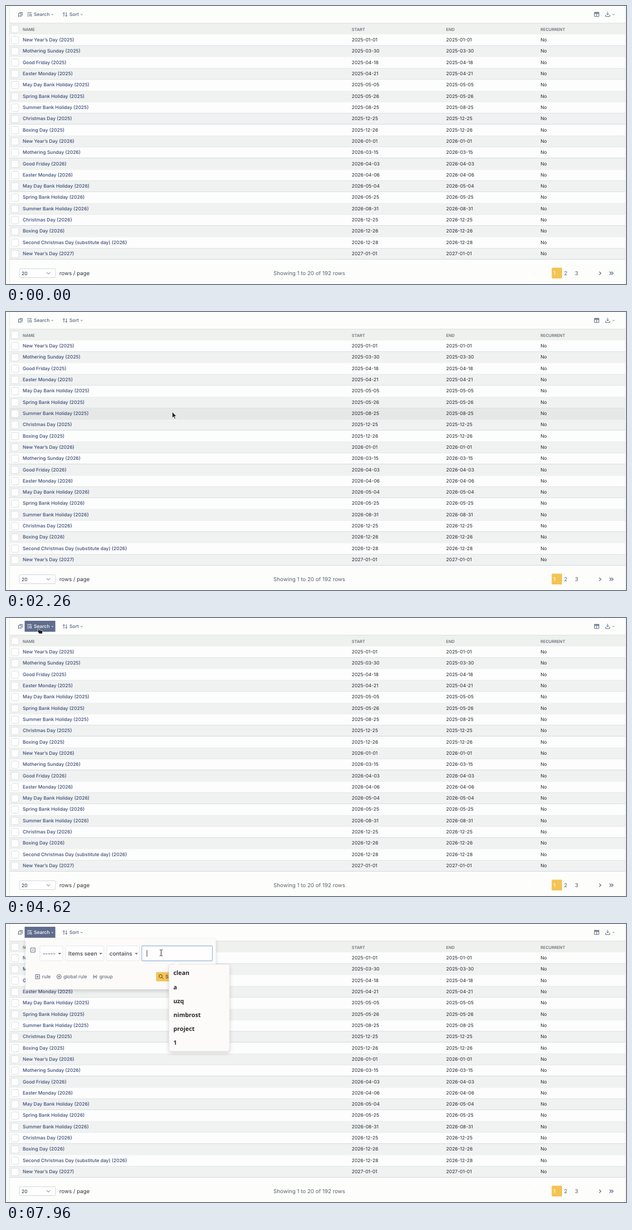
An HTML page that plays this animation: 1115x502 px, repeating every 8 s.

```html
<!DOCTYPE html>
<html lang="en">
<head>
<meta charset="utf-8">
<title>Holiday calendar</title>
<style>
html, body { margin: 0; width: 100%; height: 100%; overflow: hidden; background: #fdfefc; }
svg { display: block; }
text { font-family: Inter, sans-serif; font-size: 8.5px; white-space: pre; text-rendering: geometricPrecision; }
.link { fill: #3b4a79; font-size: 8.47px; font-weight: 500; }
.cell { fill: #23272e; }
.head { fill: #6a7380; font-size: 7.32px; font-weight: 600; }
.tool { fill: #53617f; font-weight: 500; }
.foot { fill: #59616d; font-size: 9.76px; }
.pick { fill: #41464f; font-size: 10px; font-weight: 500; }
.act { fill: #656d7b; font-weight: 500; }
.sugg { fill: #29282b; font: 600 10.8px "Noto Sans", sans-serif; }
.icon { fill: none; stroke: #5b6782; stroke-width: 1; }
.on .tool { fill: #fff; }
.on .icon { stroke: #fff; }
#panelBox, #popupBox { filter: drop-shadow(0 3px 3.6px rgba(0, 0, 0, .15)); }
</style>
</head>
<body>
<svg id="stage" width="1115" height="502" viewBox="0 0 1115 502">
  <g id="table"></g>
  <g id="toolbar"></g>
  <g id="footer"></g>
  <g id="panel"></g>
  <g id="popup"></g>
  <g id="cursor">
    <path id="arrow" fill="#222" stroke="#fff" stroke-width=".9" d="M0 0V11.2L2.6 8.8L4.6 13L6.4 12.1L4.5 8.1H8Z"/>
    <path id="hand" fill="#222" stroke="#fff" stroke-width=".7" d="M0 .8Q1-.5 2 .8V4.6L7.4 5.6Q8.6 6 8.4 7.5L7.6 11.5H2.4L-.8 7.6Q-1.3 6.4 0 6.5Z"/>
    <path id="beam" fill="none" stroke="#222" stroke-width="1" d="M-2.5-5.5Q0-5.5 0-4.5Q0-5.5 2.5-5.5M0-4.5V4.5M-2.5 5.5Q0 5.5 0 4.5Q0 5.5 2.5 5.5"/>
  </g>
</svg>
<script>
const $ = id => document.getElementById(id);
const NS = 'http://www.w3.org/2000/svg';
const LOOP = 8000, TOP = 51.4, STEP = 20.32;

function add(parent, tag, attrs, content) {
  const el = document.createElementNS(NS, tag);
  for (const k in attrs) el.setAttribute(k, attrs[k]);
  if (content) el.textContent = content;
  return parent.appendChild(el);
}
const text = (p, x, y, cls, s) => add(p, 'text', { x, y, class: cls }, s);
const rect = (p, x, y, width, height, fill, more) => add(p, 'rect', { x, y, width, height, fill, ...more });
const icon = (p, d, more) => add(p, 'path', { d, class: 'icon', ...more });
const chevron = (p, x, y, s = 1.6) => icon(p, `M${x - s} ${y - s / 2}l${s} ${s}l${s}-${s}`);
const show = (el, on) => { el.style.display = on ? '' : 'none'; };

// Holiday table
const holidays = ['New Year’s Day', 'Mothering Sunday', 'Good Friday', 'Easter Monday', 'May Day Bank Holiday',
  'Spring Bank Holiday', 'Summer Bank Holiday', 'Christmas Day', 'Boxing Day'];
const days = {
  2025: '01-01 03-30 04-18 04-21 05-05 05-26 08-25 12-25 12-26',
  2026: '01-01 03-15 04-03 04-06 05-04 05-25 08-31 12-25 12-26 12-28',
  2027: '01-01'
};
const entries = Object.entries(days).flatMap(([year, list]) => list.split(' ').map((day, i) =>
  [`${holidays[i] || 'Second Christmas Day (substitute day)'} (${year})`, `${year}-${day}`]));

const table = $('table');
const checkbox = y => rect(table, 9.5, y - 6.7, 13.4, 13.4, '#fdfefd', { rx: 2.5, stroke: '#d9dddd', 'stroke-width': .9 });
rect(table, 0, 0, 6, 502, '#f9faf6');
rect(table, 6, 31, 1108, 20.4, '#eff1ee');
const rowFill = i => i % 2 ? '#eff2f0' : '#fcfdfc';
const rows = entries.map(([name, date], i) => {
  const y = TOP + i * STEP, base = y + 12.6;
  const bg = rect(table, 6, y, 1108, STEP, rowFill(i));
  rect(table, 6, Math.floor(y + STEP), 1108, 1, '#d3d8e5');
  checkbox(y + 10.2);
  text(table, 30, base, 'link', name);
  text(table, 621.8, base, 'cell', date);
  text(table, 791.6, base, 'cell', date);
  text(table, 961.2, base, 'cell', 'No');
  return bg;
});
rect(table, 6, 30.5, 1108, .9, '#d6dae2');
rect(table, 6, 0, .8, 502, '#e3e6e6');
rect(table, 1113.4, 0, .8, 502, '#e3e6e6');
checkbox(41.4);
[['NAME', 30], ['START', 621.8], ['END', 791.6], ['RECURRENT', 961.2]]
  .forEach(([s, x]) => text(table, x, 45.4, 'head', s));

// Toolbar
const bar = $('toolbar');
icon(bar, 'M22.5 13.2h4.6v6l-2.3-1.7l-2.3 1.7zM24.3 11.6h5v6');
const search = add(bar, 'g', {});
const searchBg = rect(search, 33.5, 5, 55.2, 19.8, '#5f6d8e');
icon(search, 'M38.3 12h8M38.3 15h2.6M38.3 18h3.4M46.6 19l-1.4-1.4');
add(search, 'circle', { cx: 44, cy: 16.2, r: 1.8, class: 'icon' });
text(search, 50, 18.1, 'tool', 'Search');
chevron(search, 83.4, 15.3);
icon(bar, 'M104 19v-7.2m-2 2l2-2l2 2M108.4 11.4v7.4m-2-2l2 2l2-2');
text(bar, 114, 18.1, 'tool', 'Sort');
chevron(bar, 136, 15.3);
icon(bar, 'M1058.2 11.3h8v7.6h-8zM1058.2 12.3h8M1058.2 13.8h8M1062.2 13.8v5');
icon(bar, 'M1082 10.5v5.5m-2.3-2.2l2.3 2.2l2.3-2.2M1078.4 16v3h7.4v-3');
chevron(bar, 1092.6, 15.3);

// Footer
const foot = $('footer');
rect(foot, 24.2, 474.4, 65, 16, '#fdfefd', { rx: 2, stroke: '#cdd2d6', 'stroke-width': .9 });
text(foot, 28, 485.7, 'cell', '20');
chevron(foot, 76.2, 482.5, 3.2);
text(foot, 96, 486, 'foot', 'rows / page').style.fill = '#30363f';
text(foot, 481, 486, 'foot', 'Showing 1 to 20 of 192 rows');
rect(foot, 981.4, 472.5, 18.6, 19.5, '#f5c354', { rx: 1.5 });
text(foot, 984.2, 486, 'foot', '1').style.fill = '#fff';
text(foot, 1003.5, 486, 'foot', '2');
text(foot, 1023, 486, 'foot', '3');
icon(foot, 'M952 480l-2.6 2.6l2.6 2.6M971 480l-2.6 2.6l2.6 2.6', { opacity: .08 });
icon(foot, 'M1066.8 479.6l3 3l-3 3M1085.4 479.6l3 3l-3 3M1088.8 479.6l3 3l-3 3', { style: 'stroke-width:1.3' });

// Search panel
const panel = $('panel');
rect(panel, 35, 27, 342.4, 91, '#fcfbfa', { id: 'panelBox' });
const field = (x, w) => rect(panel, x, 39.5, w, 27, '#fefefe', { rx: 2, stroke: '#e6e6e8', 'stroke-width': .9 });
icon(panel, 'M44.3 43.3h8v7.6h-8zM46.3 47.1h4');
[['-----', 61, 41, 66], ['Items seen', 107, 69, 112], ['contains', 181, 59, 186]].forEach(([s, x, w, tx]) => {
  field(x, w);
  text(panel, tx, 56.6, 'pick', s);
  add(panel, 'path', { d: `M${x + w - 8.4} 52.3h5.6l-2.8 3z`, fill: '#686c74' });
});
const input = field(244.2, 127);
const caret = rect(panel, 253, 47, .9, 12, '#333');
icon(panel, 'M53 91.5h7.4v7.4h-7.4zM54.6 95.2h4.2M56.7 93.1v4.2');
text(panel, 64.8, 98.2, 'act', 'rule');
add(panel, 'circle', { cx: 95.4, cy: 95.2, r: 3.9, class: 'icon' });
icon(panel, 'M93.3 95.2h4.2M95.4 93.1v4.2');
text(panel, 103.2, 98.2, 'act', 'global rule');
icon(panel, 'M158.2 91.6q-1.4.2-1.1 3.6q.3 3.4 1.1 3.6M162 91.6q1.4.2 1.1 3.6q-.3 3.4-1.1 3.6M158.2 95.2h3.8M160.1 93.3v3.8');
text(panel, 168, 98.2, 'act', 'group');
rect(panel, 270, 87, 47.5, 16.4, '#f5c354', { rx: 1 });
add(panel, 'circle', { cx: 278, cy: 94.2, r: 2.9, class: 'icon', style: 'stroke:#4d4636' });
icon(panel, 'M280.2 96.4l2.8 2.8', { style: 'stroke:#4d4636' });
text(panel, 286.8, 98.2, 'tool', 'Search').style.fill = '#574d36';
icon(panel, 'M326 99v-7.3h6v5M326 99l2.6-2M330 98h4M332 96v4', { style: 'stroke:#343941' });
icon(panel, 'M347.2 91.4h8v7.6h-8zM349.4 93.4l3.6 3.6M353 93.4l-3.6 3.6', { style: 'stroke:#343941' });

// Suggestions
const popup = $('popup');
const popupBox = add(popup, 'g', { id: 'popupBox' });
rect(popupBox, 293, 73, 109, 157, '#fdfafa', { rx: 4, stroke: '#e3dddd', 'stroke-width': .7 });
add(popupBox, 'path', { d: 'M301 73.4l6-4.6l6 4.6z', fill: '#fdfafa' });
['clean', 'a', 'uzq', 'nimbrost', 'project', '1']
  .forEach((s, i) => text(popup, 301, 92.4 + i * 25.2, 'sugg', s));

// Pointer path: time, x, y
const path = [
  [1360, 448, 520], [1820, 352, 296], [2260, 299, 180.5], [2860, 184, 82], [3500, 130, 40.5],
  [4000, 92, 31], [4400, 60, 18.5], [4620, 57.5, 17], [5200, 60, 19], [5740, 60.5, 19],
  [6420, 274, 51], [6720, 279, 52], [8000, 279, 52]
];
const slope = (i, k) => (path[i + 1][k] - path[i][k]) / (path[i + 1][0] - path[i][0]);
function tangent(i, k) {
  if (i === 0) return slope(0, k);
  if (i === path.length - 1) return 0;
  const a = slope(i - 1, k), b = slope(i, k);
  return a * b > 0 ? 2 * a * b / (a + b) : 0;
}
function pointAt(t, k) {
  let i = 0;
  while (i < path.length - 2 && path[i + 1][0] <= t) i++;
  const a = path[i], b = path[i + 1], d = b[0] - a[0], u = (t - a[0]) / d;
  const u2 = u * u, u3 = u2 * u;
  return (2 * u3 - 3 * u2 + 1) * a[k] + (u3 - 2 * u2 + u) * d * tangent(i, k)
    + (3 * u2 - 2 * u3) * b[k] + (u3 - u2) * d * tangent(i + 1, k);
}

const OPEN = 5560, FOCUS = 6640, SUGGEST = 7200;
const TIP = 4; // hot spot below the outline, plus the lag of the hover style

function render(t) {
  const visible = t >= path[0][0];
  const x = visible ? pointAt(t, 1) : -99, y = visible ? pointAt(t, 2) : -99;
  const open = t >= OPEN, focus = t >= FOCUS;
  const overSearch = x > 33 && x < 89 && y > 5 && y < 24.5;
  const inInput = open && x > 244 && x < 371 && y > 39 && y < 67;
  const inHead = !open && y < TOP && x < 610;
  const pointing = overSearch || inHead;

  const hovered = open || inHead || !visible ? -1 : Math.floor((y + TIP - TOP) / STEP);
  rows.forEach((r, i) => r.setAttribute('fill', i === hovered ? '#e5e8e6' : rowFill(i)));

  const active = open || overSearch;
  search.setAttribute('class', active ? 'on' : '');
  show(searchBg, active);

  show(panel, open);
  panel.setAttribute('opacity', Math.max(0, Math.min(1, (t - OPEN) / 200)));
  input.setAttribute('stroke', focus ? '#a3bddb' : '#e6e6e8');
  input.setAttribute('stroke-width', focus ? 1.3 : .9);
  show(caret, focus && (t - FOCUS) % 1200 < 600);
  show(popup, t >= SUGGEST);

  show($('cursor'), visible);
  $('cursor').setAttribute('transform', `translate(${x.toFixed(2)} ${y.toFixed(2)})`);
  show($('beam'), inInput);
  show($('hand'), pointing);
  show($('arrow'), !inInput && !pointing);
}

const start = performance.now();
function tick() {
  render((performance.now() - start) % LOOP);
  requestAnimationFrame(tick);
}
tick();
</script>
</body>
</html>
```
